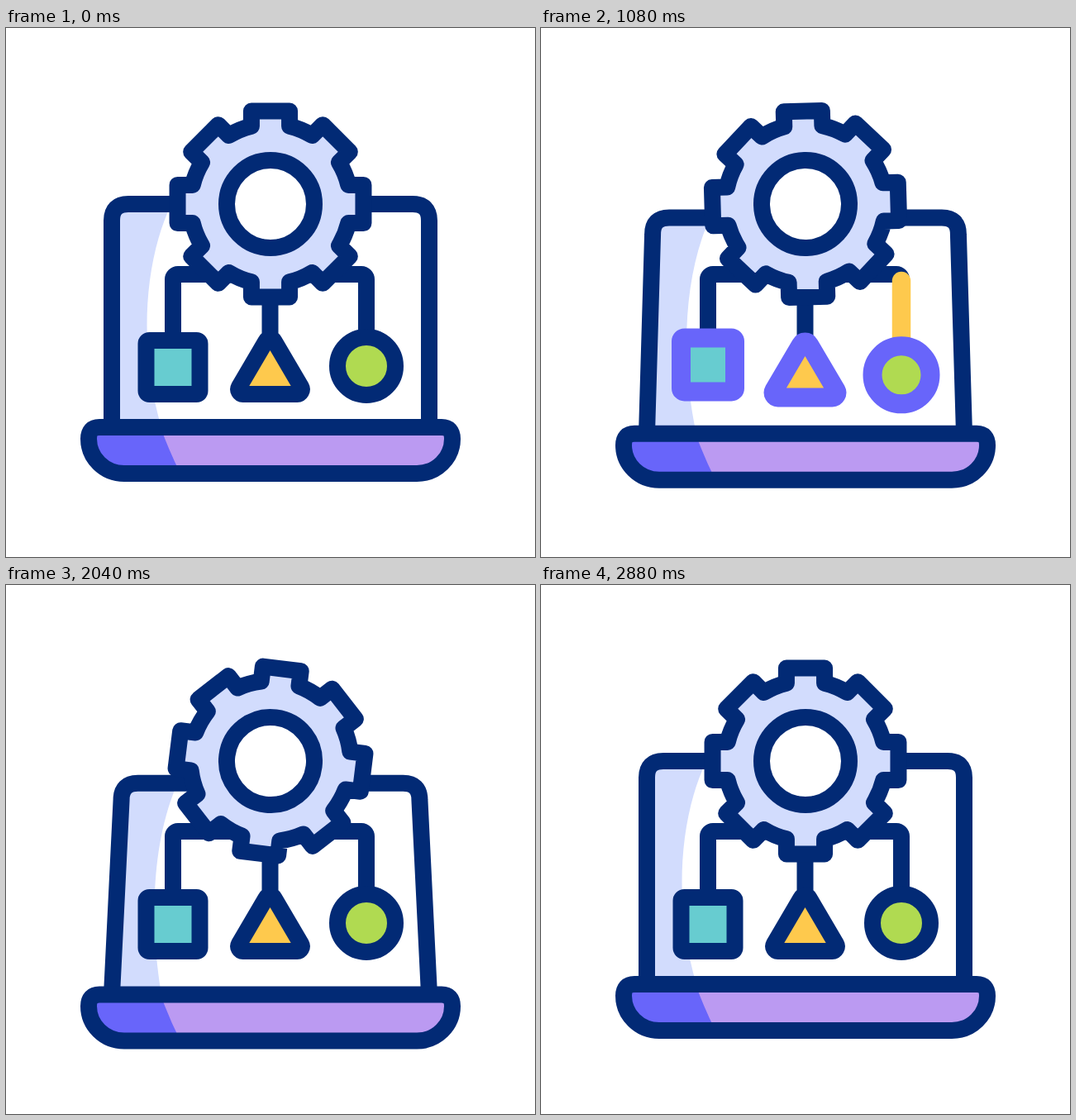
An HTML page for the animation above (3200 ms loop, 640 by 640 pixels).

```html
<!DOCTYPE html>
<html lang="en">
<head>
<meta charset="utf-8">
<title>Laptop workflow</title>
<style>
  html, body { margin: 0; width: 100%; height: 100%; overflow: hidden; background: #fff; }
  svg { display: block; width: 100vw; height: 100vh; }
  .ink { stroke: #022a75; stroke-width: 20; stroke-linejoin: round; stroke-linecap: round; }
  .pulse { stroke: #fec94d; stroke-width: 22.5; stroke-linecap: round; fill: none; }
</style>
</head>
<body>
<svg viewBox="0 0 640 640">
  <path id="glare" fill="#d2dcfd"/>
  <path id="lid" class="ink" fill="none"/>
  <g id="base">
    <path fill="#bb9af2" d="M113 483H527Q540 483 540 497C540 520 521 539 497 539H143C119 539 100 520 100 497Q100 483 113 483Z"/>
    <path fill="#6865fa" d="M113 483H187Q197 511 211 539H143C119 539 100 520 100 497Q100 483 113 483Z"/>
    <path class="ink" fill="none" d="M113 483H527Q540 483 540 497C540 520 521 539 497 539H143C119 539 100 520 100 497Q100 483 113 483Z"/>
  </g>
  <g id="wires"></g>
  <g id="nodes">
    <rect class="ink" x="169.5" y="378" width="65" height="65" rx="4" fill="#67ccd0"/>
    <path id="triangle" class="ink" fill="#fec94d"/>
    <circle class="ink" cx="436" cy="409" r="35" fill="#b0da51"/>
  </g>
  <g id="gear">
    <path id="cog" class="ink" fill="#d2dcfd"/>
    <circle class="ink" cx="320" cy="213" r="53" fill="#fff"/>
  </g>
</svg>
<script>
const LOOP = 3200, MOVE = 2880, STEP = 20, STAGGER = 100;
const INK = [2, 42, 117], GLOW = [104, 101, 250];
const $ = id => document.getElementById(id);
const clamp = x => Math.min(1, Math.max(0, x));

// Monotone cubic through [time, value] keys; flat at ends and extremes.
function curve(keys) {
  const rate = i => (keys[i + 1][1] - keys[i][1]) / (keys[i + 1][0] - keys[i][0]);
  const slopes = keys.map((_, i) => {
    if (i === 0 || i === keys.length - 1) return 0;
    const a = rate(i - 1), b = rate(i);
    return a * b > 0 ? 2 * a * b / (a + b) : 0;
  });
  return t => {
    if (t <= keys[0][0]) return keys[0][1];
    const i = keys.findIndex(k => k[0] >= t) - 1;
    if (i < 0) return keys[keys.length - 1][1];
    const [t0, v0] = keys[i], [t1, v1] = keys[i + 1];
    const span = t1 - t0, s = (t - t0) / span, r = 1 - s;
    return v0 * r * r * (1 + 2 * s) + v1 * s * s * (3 - 2 * s)
      + span * s * r * (slopes[i] * r - slopes[i + 1] * s);
  };
}

const sway = curve([[0, 0], [380, -8], [480, -7], [800, 3.5], [1080, 7.7], [1340, 10.6],
  [1620, 12], [1900, 12.8], [2040, 12.6], [2160, 11.6], [2480, -9], [2880, 0]]);
const gearAngle = curve([[0, 0], [430, -7.4], [1980, 7.8], [2480, -11], [2880, 0]]);
const bounce = curve([[0, 0], [220, 13.5], [620, -6.9], [800, 4], [960, 0]]);

function cogPath() {
  const at = (r, deg) => {
    const a = deg * Math.PI / 180;
    return `${(320 + r * Math.sin(a)).toFixed(2)} ${(213 - r * Math.cos(a)).toFixed(2)}`;
  };
  let d = "";
  for (let a = 0; a < 360; a += 45) {
    d += d ? `A97 97 0 0 1 ${at(97, a - 13.75)}` : `M${at(97, a - 13.75)}`;
    d += `L${at(114.8, a - 11.6)}L${at(114.8, a + 11.6)}L${at(97, a + 13.75)}`;
  }
  return d + `A97 97 0 0 1 ${at(97, -13.75)}Z`;
}

// Polygon whose corners are cut back by `cut` and joined with arcs of radius r.
function roundedPolygon(points, cut, r) {
  const toward = ([x, y], [u, v]) => {
    const k = cut / Math.hypot(u - x, v - y);
    return `${x + (u - x) * k} ${y + (v - y) * k}`;
  };
  const n = points.length;
  return points.map((p, i) =>
    `${i ? "L" : "M"}${toward(p, points[(i + n - 1) % n])}A${r} ${r} 0 0 1 ${toward(p, points[(i + 1) % n])}`
  ).join("") + "Z";
}

$("cog").setAttribute("d", cogPath());
$("triangle").setAttribute("d",
  roundedPolygon([[319.5, 370.3], [362.2, 443], [276.8, 443]], 10, 5.8));

const routes = [
  "M320 298H208A6 6 0 0 0 202 304V385",
  "M319.5 240V378",
  "M320 298H430A6 6 0 0 1 436 304V380"
];
function addWire(d, cls) {
  const path = document.createElementNS("http://www.w3.org/2000/svg", "path");
  path.setAttribute("d", d);
  path.setAttribute("class", cls);
  path.setAttribute("fill", "none");
  $("wires").append(path);
  return path;
}
routes.forEach(d => addWire(d, "ink"));
const pulses = routes.map(d => {
  const path = addWire(d, "pulse");
  return { path, length: path.getTotalLength() };
});
const nodes = [...$("nodes").children];

function drawLaptop(y) {
  const top = 213 + y * (y > 0 ? 2.13 : 1.75);
  const dx = y * (y > 0 ? 0.92 : 0.65);
  const left = 128 + dx, right = 512 - dx, foot = 483 + y;
  $("base").setAttribute("transform", `translate(0 ${y})`);
  $("lid").setAttribute("d", `M128 ${foot}L${left} ${top + 20}Q${left} ${top} ${left + 20} ${top}`
    + `H${right - 20}Q${right} ${top} ${right} ${top + 20}L512 ${foot}`);
  const third = (foot - top) / 3;
  $("glare").setAttribute("d", `M128 ${foot}L${left} ${top + 20}Q${left} ${top} ${left + 20} ${top}`
    + `H${200 + dx * 0.65}C${163 + dx} ${top + third * 0.87} ${163 + dx} ${foot - third * 0.93} 188 ${foot}Z`);
}

function travel(t) {
  const u = Math.max(0, t - 80);
  return 0.2 * u + 0.00019 * u * u;
}

function drawPulse({ path, length }, t) {
  const head = Math.min(length, travel(t)), tail = travel(t - 370);
  const visible = head > 0 && tail < length;
  path.style.display = visible ? "" : "none";
  if (!visible) return;
  path.setAttribute("stroke-dasharray", `${head - tail} 999`);
  path.setAttribute("stroke-dashoffset", -tail);
}

function drawNode(node, t) {
  const glow = clamp(t / 100) * clamp((720 - t) / 100);
  const mix = INK.map((c, i) => Math.round(c + (GLOW[i] - c) * glow));
  node.style.stroke = `rgb(${mix})`;
  node.style.strokeWidth = 20 + 3 * glow;
  node.setAttribute("transform", `translate(0 ${bounce(t)})`);
}

function draw(time) {
  const t = Math.min(MOVE, Math.floor(time % LOOP / STEP) * STEP);
  drawLaptop(sway(t));
  $("gear").setAttribute("transform", `rotate(${gearAngle(t)} 320 213)`);
  pulses.forEach((pulse, i) => drawPulse(pulse, t - i * STAGGER));
  nodes.forEach((node, i) => drawNode(node, t - 570 - i * STAGGER));
}

const start = performance.now();
function tick() {
  draw(performance.now() - start);
  requestAnimationFrame(tick);
}
tick();
</script>
</body>
</html>
```
